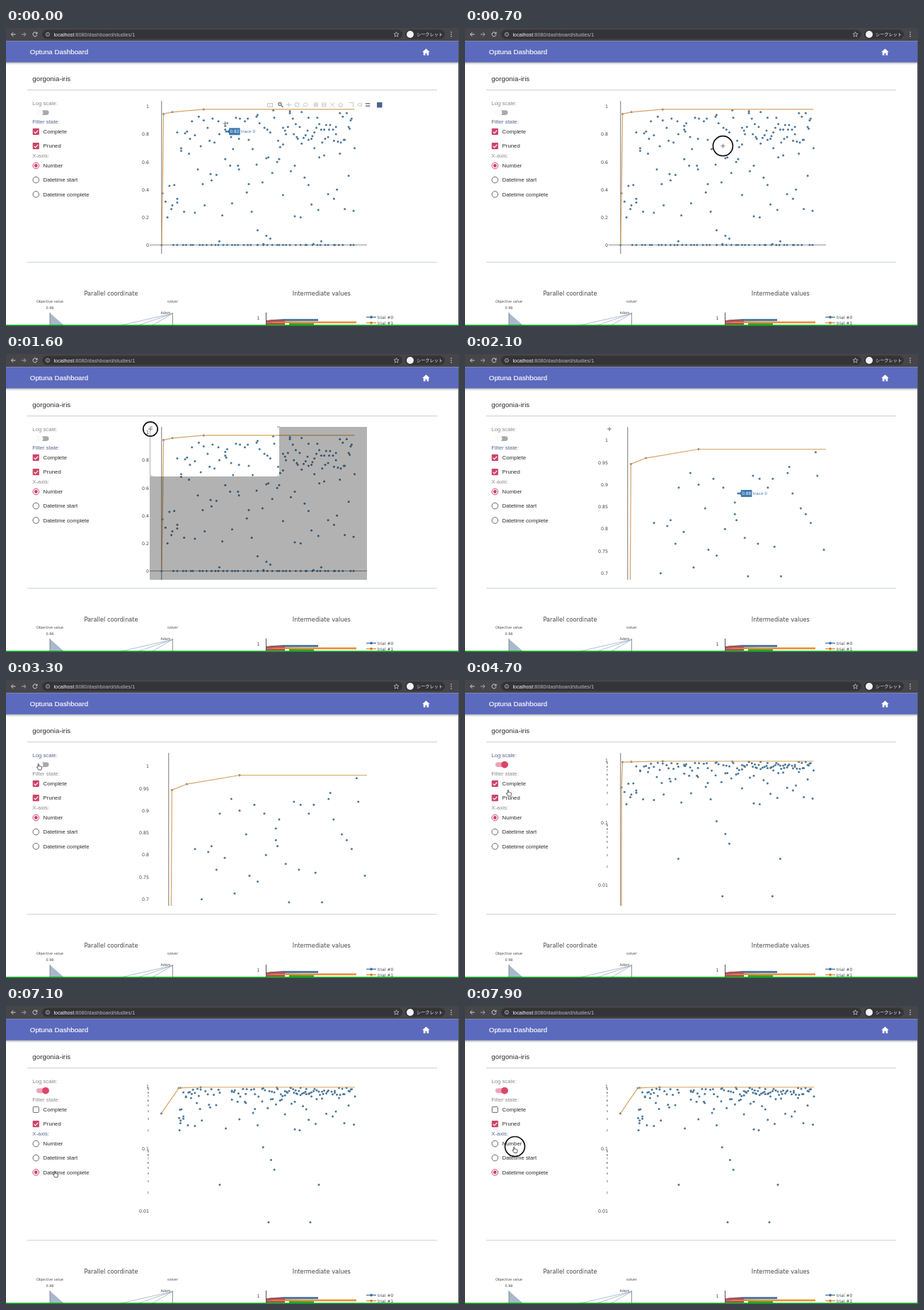
An HTML page for the animation above (8 s loop, 640x421 px).

```html
<!DOCTYPE html>
<html lang="en">
<head>
<meta charset="utf-8">
<title>Study dashboard</title>
<style>
  html, body { margin: 0; width: 100%; height: 100%; overflow: hidden; background: #fff; }
  svg { display: block; width: 640px; height: 421px; }
  text { font-family: "Liberation Sans", Arial, sans-serif; font-size: 7.8px; fill: #2c2c2c; }
  .plot text { font-family: "DejaVu Sans", Verdana, sans-serif; font-size: 6.3px; fill: #444; }
  .plot .minor { font-size: 4px; }
  .plot .tiny { font-size: 4.9px; }
  .plot .head { font-size: 8.2px; }
  .plot .legend { font-size: 5.9px; }
  .end { text-anchor: end; }
  .mid { text-anchor: middle; }
  .label { fill: #8a8a8a; }
  .label.focus { fill: #566690; }
  .line { fill: none; stroke-linejoin: round; }
  .dot { fill: #4c7799; }
</style>
</head>
<body>
<svg viewBox="0 0 640 421">
  <defs>
    <clipPath id="area"><rect x="203" y="103" width="307" height="216"/></clipPath>
    <linearGradient id="shade" x2="0" y2="1">
      <stop stop-color="#000" stop-opacity=".3"/><stop offset="1" stop-color="#000" stop-opacity="0"/>
    </linearGradient>
  </defs>

  <!-- browser bar -->
  <rect width="640" height="18.5" fill="#464549"/>
  <rect x="51" y="2.5" width="509" height="13" rx="6.5" fill="#343337"/>
  <g class="line" stroke="#d5d5d5">
    <path d="M13.5 9H7.5M10.2 6.2L7.4 9l2.8 2.8"/>
    <path d="M22 9h6M25.3 6.2L28.1 9l-2.8 2.8" stroke="#aaa"/>
    <path d="M43.6 7.3A3 3 0 1 0 44 9.6M44 5.8V8H41.8"/>
    <circle cx="59" cy="9" r="2.6" stroke-width=".7"/>
    <path d="M59 8.7v1.7M59 7.4v.5M551.5 5.6l1 2.3 2.5.2-1.9 1.6.6 2.5-2.2-1.3-2.2 1.3.6-2.5-1.9-1.6 2.5-.2z" stroke-width=".7"/>
  </g>
  <text x="67.5" y="11.6" style="font-size:7.3px;fill:#b8b8bb"><tspan fill="#f5f5f5">localhost</tspan>:8080/dashboard/studies/1</text>
  <rect x="564" y="2.5" width="56" height="13" rx="6.5" fill="#343337"/>
  <circle cx="571" cy="9" r="5" fill="#f2f2f2"/>
  <text x="580" y="11.3" style="font:6.2px 'Noto Sans CJK JP','Noto Sans CJK',sans-serif;fill:#f0f0f0">シークレット</text>
  <path d="M629 6v.01M629 9v.01M629 12v.01" stroke="#ddd" stroke-width="1.6" stroke-linecap="round"/>

  <!-- app bar -->
  <rect y="48" width="640" height="4" fill="url(#shade)"/>
  <rect y="18.5" width="640" height="30" fill="#5c6abe"/>
  <text x="33.8" y="37" style="font-size:9.75px;fill:#fff;stroke:#fff;stroke-width:.15">Optuna Dashboard</text>
  <path d="M593.5 29.2l-5.3 4.9h1.6v4.3h2.7v-3h2v3h2.7v-4.3h1.6z" fill="#fff"/>

  <text x="37.3" y="75" style="font-size:9.8px">gorgonia-iris</text>
  <path d="M30 87.6H609M30 331H609" stroke="#c9cdcf"/>
  <g id="form"></g>
  <g class="plot" id="chart"></g>
  <g id="drag"></g>

  <!-- lower charts -->
  <g class="plot">
    <text class="head" x="110.5" y="377.8">Parallel coordinate</text>
    <text class="head" x="404.8" y="377.8">Intermediate values</text>
    <text class="tiny mid" x="62" y="388">Objective value</text>
    <text class="tiny mid" x="62" y="397">0.98</text>
    <text class="tiny mid" x="235.5" y="388">solver</text>
    <path d="M62 402.5V421H83z" fill="#a8b8cc"/>
    <path class="line" d="M235 403.5L158 421M235 403.5L184 421M235 403.5L205 421" stroke="#8ba2bd" stroke-width=".7"/>
    <path d="M62 402V421M235.5 402V421" stroke="#777" stroke-width=".8"/>
    <text class="tiny end" x="232.5" y="404.2">Adam</text>
    <text class="end" x="358.5" y="412">1</text>
    <path d="M367.5 402V421" stroke="#555"/>
    <g class="line" stroke-width="2.8">
      <path d="M372 414L392 412.5H441" stroke="#4a7dad"/>
      <path d="M400 418.4H435" stroke="#3f9a3f"/>
      <path d="M368 417L384 415.3L420 415.8H495" stroke="#e8913c"/>
      <path d="M368 414.5L380 413.5H394M368 418H394" stroke="#a8525a"/>
    </g>
    <g stroke-width="1.4" stroke="#4a7dad"><path d="M509 408.5h14"/><circle cx="516" cy="408.5" r="1.2"/></g>
    <g stroke-width="1.4" stroke="#e8913c"><path d="M509 416.5h14"/><circle cx="516" cy="416.5" r="1.2"/></g>
    <text class="legend" x="525" y="410.6">trial #0</text>
    <text class="legend" x="525" y="418.6">trial #1</text>
  </g>
  <path d="M639.5 18.5V420" stroke="#555"/>
  <rect y="419.3" width="640" height="1.7" fill="#0a9a1c"/>

  <circle id="ring" fill="none" stroke="#111" stroke-width="1.7"/>
  <g id="cursor"></g>
</svg>

<script>
const $ = id => document.getElementById(id);
const LOOP = 8000;

// Each trial is [number, correct answers out of 150].
const best = [[1, 56], [2, 142], [11, 144], [43, 147]];
const outliers = [[59, 4], [98, 16], [104, 1], [107, 10], [111, 7], [155, 1], [163, 4]];
const hovered = [[66, 123], [67, 132]];

let seed = 11;
const rand = () => (seed = seed * 16807 % 2147483647) / 2147483647;
const scatter = (count, from, to, low, high) => Array.from({ length: count }, (_, i) =>
  [from + (to - from) * (i + rand()) / count, low + (high - low) * rand()].map(Math.round));

const trials = [
  [0, 0], ...best, ...outliers, ...hovered,
  ...scatter(36, 16, 120, 103, 146),
  ...scatter(52, 121, 197, 104, 146),
  ...scatter(8, 3, 18, 30, 65),
  ...scatter(44, 18, 197, 30, 102),
  ...scatter(45, 11, 197, 0, 0)
];

// Piecewise linear track; rows are [t, ...values].
function along(rows, t) {
  let i = 1;
  while (i < rows.length - 1 && rows[i][0] < t) i++;
  const [a, b] = [rows[i - 1], rows[i]];
  const f = Math.max(0, Math.min(1, (t - a[0]) / (b[0] - a[0])));
  return a.slice(1).map((v, k) => v + (b[k + 1] - v) * f);
}

// Trials finish in bursts.
const finish = [[1, 219.5], [2, 244], [12, 247], [43, 275], [59, 302], [66, 322], [104, 371], [155, 430], [197, 493]];

const fullX = n => 219.8 + n * 1.384;
const fullY = c => 306.5 - c * 1.3033;
const zoomY = c => 122 + (150 - c) * 4.173;
const logY = c => c ? 114 - 88 * Math.log10(c / 150) : 2500;

function linTicks(from, step, y) {
  const ticks = [];
  for (let v = from; v < 1.001; v += step) ticks.push([+v.toFixed(2), y(v * 150)]);
  return ticks;
}
const logTicks = [];
for (let d = 0; d < 3; d++)
  for (let m = 1; m < 10; m++) {
    const y = 114 + 88 * (d - Math.log10(m));
    if (y > 113 && y < 319) logTicks.push(m === 1 ? [10 ** -d, y] : [m, y, 'minor']);
  }

const views = {
  full: { x: fullX, y: fullY, axis: 219.8, base: 306.5, first: 0, ticks: linTicks(0, .2, fullY) },
  zoom: { x: n => 229.8 + n * 2.33, y: zoomY, axis: 229.8, first: 0, ticks: linTicks(.7, .05, zoomY) },
  log: { x: fullX, y: logY, axis: 219.8, first: 0, ticks: logTicks },
  pruned: { x: n => 219.5 + (n - 1) * 1.394, y: logY, axis: 218.8, first: 1, ticks: logTicks },
  date: { x: n => along(finish, n)[0], y: logY, first: 1, ticks: logTicks }
};

const stages = [
  { from: 0, view: 'full', focus: 'filter' },
  { from: 1700, view: 'zoom', focus: 'filter' },
  { from: 3200, view: 'zoom', focus: 'log' },
  { from: 3400, view: 'log', focus: 'log' },
  { from: 5200, view: 'pruned', focus: 'filter' },
  { from: 6750, view: 'date', focus: 'axis' }
];
const drag = [650, 1650];
const presses = [drag, ...[3050, 5050, 6600, 7850].map(t => [t, t + 200])];
const path = [[150, 309.5, 135], [500, 386, 173], [650, 386, 173], [900, 280, 142], [1300, 204, 106],
  [2200, 204, 106], [2900, 47, 123], [4300, 47, 123], [4700, 62, 160], [5500, 60, 153],
  [6300, 70, 226], [6600, 70, 238], [7200, 70, 238], [7800, 70.5, 203.5]];

const text = (x, y, s, cls = '') => `<text x="${x}" y="${y}" class="${cls}">${s}</text>`;
const stroke = (d, color, w = 1) => `<path class="line" d="${d}" stroke="${color}" stroke-width="${w}"/>`;

function drawChart(name, hover, bar) {
  const v = views[name], at = ([n, c]) => [v.x(n), v.y(c)].map(p => +p.toFixed(2));
  const shown = list => list.filter(p => p[0] >= v.first).map(at);
  let inner = '';
  if (v.axis) inner += stroke(`M${v.axis} 103V319`, '#777');
  if (v.base) inner += stroke(`M203 ${v.base}H510`, '#888', .9);
  for (const [x, y] of shown(trials))
    if (y < 320) inner += `<circle class="dot" cx="${x}" cy="${y}" r="1.5"/>`;
  inner += stroke('M' + shown([[0, 0], ...best, [197, 147]]).join('L'), '#d6a362', 1.2);

  let out = `<g clip-path="url(#area)">${inner}</g>`;
  for (const [label, y, cls = ''] of v.ticks)
    out += text(202, y + (cls ? 1.4 : 2.3), label, 'end ' + cls);
  if (hover) out += drawHover(at(hover), (hover[1] / 150).toFixed(2));
  if (bar) out += modebar();
  $('chart').innerHTML = out;
}

function drawHover([x, y], value) {
  return `<path d="M${x} ${y}l4-2.5v-2.5h15.5v10h-15.5v-2.5z" fill="#4079ae"/>`
    + `<text x="${x + 5.3}" y="${y + 2.1}" style="font-size:5.9px;fill:#fff">${value}</text>`
    + `<text x="${x + 20.8}" y="${y + 2}" style="font-size:5.7px;fill:#4079ae">trace 0</text>`;
}

// Toolbar glyphs by group, each centred on its own origin.
const square = 'M-2.5 -2.5h5v5h-5z';
const tools = [
  ['M-3.5 -2h7v5h-7zM-1 .5h2'],
  ['M1 1L3.5 3.5M-3 -1a2 2 0 1 0 4 0a2 2 0 1 0 -4 0', 'M-3.5 0h7M0 -3.5v7', square, 'M-3 3L-1.5 1.5C-5 -1 2 -5 3 -1S0 2 -1.5 1.5'],
  [square + 'M-2.5 0h5M0 -2.5v5', square + 'M-2.5 0h5', 'M-3 -3L3 3M3 -3L-3 3', 'M-3 0L0 -3L3 0M-2 0v3h4v-3'],
  ['M-3 -3h6v6', 'M-3 0l2 -1.7h4v3.4h-4z', 'M-3 -1.7h6.5M-3 1.7h6.5']
];
function modebar() {
  let x = 373, out = '';
  tools.forEach((group, g) => {
    group.forEach((d, i) => {
      const active = g === 1 && i === 0 || g === 3 && i === 2;
      out += `<g transform="translate(${x} 108.5)">${stroke(d, active ? '#777' : '#c6c6c6', active ? 1.4 : 1)}</g>`;
      x += 11.6;
    });
    x += 3.4;
  });
  return out + '<rect x="524" y="105" width="7.5" height="7.5" fill="#4a658f"/>';
}

function drawForm(view, focus) {
  const log = view !== 'full' && view !== 'zoom', partial = view === 'pruned' || view === 'date';
  const pink = '#cc4468';
  const label = (y, s, key) => text(37.3, y, s, 'label' + (key === focus ? ' focus' : ''));
  const box = (y, s, on) => (on
    ? `<rect x="37.7" y="${y - 4.6}" width="9.2" height="9.2" rx="1" fill="${pink}"/>`
      + stroke(`M39.6 ${y + .2}l2 2 3.7-4`, '#fff', 1.2)
    : `<rect x="38.3" y="${y - 4}" width="8" height="8" rx=".8" fill="none" stroke="#666"/>`)
    + text(52.6, y + 2.6, s);
  const radio = (y, s, on) => `<circle cx="42.3" cy="${y}" r="4.3" fill="none" stroke="${on ? pink : '#666'}"/>`
    + (on ? `<circle cx="42.3" cy="${y}" r="2.4" fill="${pink}"/>` : '') + text(52.6, y + 2.6, s);
  const [knobX, knob, track] = log ? [56, '#dc456a', '#efa3b7'] : [47.5, '#fafafa', '#a9a9a9'];
  $('form').innerHTML =
    label(108.8, 'Log scale:', 'log')
    + `<rect x="43" y="116.3" width="17.5" height="6.6" rx="3.3" fill="${track}"/>`
    + `<circle cx="${knobX}" cy="119.6" r="4.9" fill="${knob}"/>`
    + label(135, 'Filter state:', 'filter')
    + box(146.4, 'Complete', !partial) + box(166.6, 'Pruned', true)
    + label(183, 'X-axis:', 'axis')
    + radio(194.5, 'Number', view !== 'date') + radio(214.6, 'Datetime start', false)
    + radio(235, 'Datetime complete', view === 'date');
}

function drawDrag(t) {
  if (t < drag[0] || t > drag[1]) return '';
  const [px, py] = along(path, t - 50);
  const x = Math.max(203, px), y = py < 107 ? 103 : py + 2;
  if (y > 171) return '';
  const corner = (cx, cy, dx, dy) => `M${cx} ${cy + dy}V${cy}H${cx + dx}`;
  const d = corner(x, y, 3, 3) + corner(386, y, -3, 3) + corner(x, 173, 3, -3) + corner(386, 173, -3, -3);
  return `<path d="M203 103H510V319H203zM${x} ${y}V173H386V${y}z" fill="#000" fill-opacity=".3"/>`
    + stroke(d, '#777', 2) + stroke(d, '#fff', 1.2);
}

const shapes = {
  cross: stroke('M-3 0H3M0 -3V3', '#fff', 1.8) + stroke('M-3 0H3M0 -3V3', '#666', .9),
  arrow: '<path d="M0 -4v8l1.9-1.8 1.4 3 1.2-.6-1.4-2.9h2.6z" fill="#111" stroke="#fff" stroke-width=".6"/>',
  hand: '<path d="M-1.9 -3.8c0-1.1 1.4-1.1 1.4 0v2.6c.4-.6 1.3-.4 1.4.2c.5-.4 1.3-.2 1.4.4c.7-.3 1.3.1 1.3.8c0 1.7-.4 2.2-.8 3.8h-3.8c-.7-1.3-1.6-2.3-2.5-3.4c-.4-.8.6-1.3 1.6-.2z" fill="#fff" stroke="#333" stroke-width=".8"/>'
};

let lastKey = '', lastShape = '';
function frame() {
  const t = performance.now() % LOOP;
  const { from, view, focus } = stages.findLast(s => s.from <= t);
  const hover = t < 200 ? hovered[0] : view === 'zoom' && t < 2400 ? hovered[1] : null;
  const bar = t < drag[0];

  const key = [from, hover, bar].join();
  if (key !== lastKey) {
    drawChart(view, hover, bar);
    drawForm(view, focus);
    lastKey = key;
  }
  $('drag').innerHTML = drawDrag(t);

  const [x, y] = along(path, t);
  const shape = x >= 203 ? 'cross' : x < 130 ? 'hand' : 'arrow';
  if (shape !== lastShape) $('cursor').innerHTML = shapes[lastShape = shape];
  $('cursor').setAttribute('transform', `translate(${x} ${y})`);

  const press = presses.find(([a, b]) => t >= a && t < b), ring = $('ring');
  ring.setAttribute('r', press ? Math.max(10.2, 15 - (t - press[0]) * .02) : 0);
  ring.setAttribute('cx', x);
  ring.setAttribute('cy', shape === 'hand' ? y - 5 : y);
  ring.setAttribute('visibility', press ? 'visible' : 'hidden');
  requestAnimationFrame(frame);
}
frame();
</script>
</body>
</html>
```
